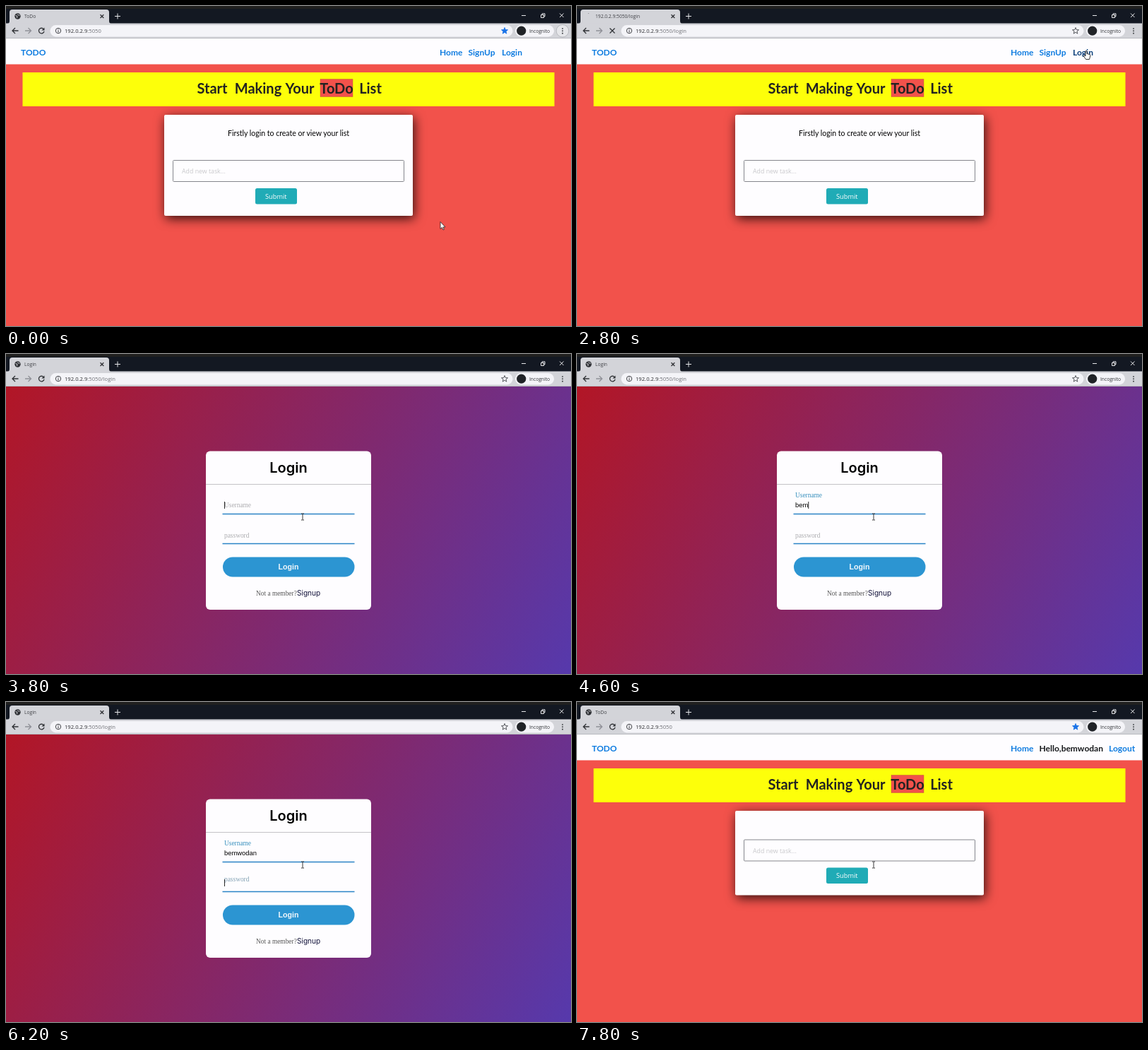
An HTML page for the animation above (8 s loop, 800 by 453 pixels).

```html
<!DOCTYPE html>
<html lang="en">
<head>
<meta charset="utf-8">
<title>ToDo</title>
<style>
  html, body { margin: 0; width: 100%; height: 100%; overflow: hidden; background: #131822; }
  svg { display: block; width: 100%; height: 100%; }
  text { white-space: pre; }
  .ui { font-family: "Open Sans", sans-serif; }
  .casual { font-family: Lato, sans-serif; font-weight: 700; }
  .round { font-family: Inter, sans-serif; }
  .serif { font-family: "Liberation Serif", serif; font-size: 9.4px; }
  .arial { font-family: "Liberation Sans", sans-serif; }
  .mid { text-anchor: middle; }
  .line { fill: none; stroke: #303236; stroke-width: 1.3; }
  .nav { font-size: 12px; fill: #0f7ce0; }
  .heading { font-size: 20px; fill: #222; text-anchor: middle; }
  #card { filter: drop-shadow(2px 4px 8px rgba(0, 0, 0, .8)); }
</style>
</head>
<body>
<svg viewBox="0 0 800 453">
  <defs>
    <linearGradient id="dusk" gradientUnits="userSpaceOnUse" x1="12" y1="25.5" x2="788" y2="473.5">
      <stop stop-color="#b21626"/><stop offset="1" stop-color="#5639ac"/>
    </linearGradient>
  </defs>

  <g id="home">
    <rect y="46" width="800" height="407" fill="#f2524b"/>
    <rect y="46" width="800" height="36.5" fill="#fefdff"/>
    <g class="casual nav">
      <text x="21" y="69.5">TODO</text>
      <text x="614" y="69.5">Home</text>
      <g id="guestLinks">
        <text x="654.5" y="69.5">SignUp</text>
        <text id="loginLink" x="702" y="69.5">Login</text>
      </g>
      <g id="memberLinks">
        <text id="greeting" x="654.5" y="69.5" fill="#16181b"></text>
        <text x="753" y="69.5">Logout</text>
      </g>
    </g>
    <rect x="23.5" y="94" width="753" height="48" fill="#fdff0a"/>
    <rect x="445" y="103.5" width="46" height="25" fill="#f2524b" stroke="#b5542c" stroke-width=".8" stroke-dasharray="1 1"/>
    <g class="casual heading">
      <text x="292" y="124">Start</text>
      <text x="357" y="124">Making</text>
      <text x="416" y="124">Your</text>
      <text x="468" y="124">ToDo</text>
      <text x="516" y="124">List</text>
    </g>
    <rect id="card" x="224" y="154" width="352" height="143" rx="2" fill="#fefdff"/>
    <text id="hint" class="casual mid" style="font-weight:400" x="400" y="184" font-size="10.5">Firstly login to create or view your list</text>
    <g id="taskForm" class="ui">
      <rect x="236.5" y="218.5" width="327" height="30" rx="1" fill="#fefdff" stroke="#85868c"/>
      <text x="249" y="237" font-size="8.8" fill="#c9c9cc">Add new task...</text>
      <rect x="353" y="258" width="59" height="22.5" rx="2.5" fill="#20abb6"/>
      <text class="mid" x="382.3" y="272.7" font-size="9.2" fill="#fff">Submit</text>
    </g>
  </g>

  <g id="login">
    <rect y="46" width="800" height="407" fill="url(#dusk)"/>
    <rect x="283" y="137.5" width="234" height="224.5" rx="6" fill="#fefdff"/>
    <text class="round mid" x="400" y="168" font-size="20" font-weight="600">Login</text>
    <path d="M283 184.5H517" stroke="#c4c3c7"/>
    <path d="M306.5 226.5H493.5M306.5 268.5H493.5" stroke="#2a83c6" stroke-width="1.5"/>
    <text id="userLabel" class="serif" x="309">Username</text>
    <text id="passLabel" class="serif" x="309">password</text>
    <text id="userText" class="arial" x="309" y="217" font-size="9.4"></text>
    <text id="passText" class="arial" x="309" y="259.3" font-size="9.4"></text>
    <path id="caret" d="M.5 0V10" stroke="#111" stroke-width=".9"/>
    <rect x="307" y="287.5" width="186.5" height="28" rx="14" fill="#2c95d2"/>
    <text class="arial mid" x="400" y="304.5" font-size="10.6" font-weight="700" fill="#f2f8fc">Login</text>
    <text class="serif" x="354" y="342.3" fill="#555">Not a member?</text>
    <text class="round" x="412" y="342.3" font-size="10.1" fill="#12123a">Signup</text>
  </g>

  <g id="browser">
    <rect width="800" height="25" fill="#131822"/>
    <rect width="800" height="4" fill="#20201f"/>
    <path d="M2 25Q5 25 5 21V9Q5 5 9 5H142Q146 5 146 9V21Q146 25 149 25Z" fill="#d3d4d9"/>
    <rect y="24.5" width="800" height="21.5" fill="#d3d4d9"/>
    <path d="M0 45.5H800" stroke="#b9babf"/>
    <g id="globe">
      <circle cx="16.5" cy="14.5" r="4.2" fill="#303236"/>
      <path d="M13.5 13.5L16 14.5 15.5 17M16 11.5L17.5 13H19.5" fill="none" stroke="#d3d4d9"/>
    </g>
    <circle id="spinner" cx="16.5" cy="14.5" r="4" fill="none" stroke="#85878d"/>
    <text id="tabTitle" class="ui" x="26" y="17" font-size="6.7" fill="#404247"></text>
    <path class="line" d="M133.5 12.2L138.3 17M138.3 12.2L133.5 17"/>
    <g fill="none" stroke="#e4e5e8">
      <path d="M154 14.5H162M158 10.5V18.5M730 13.5H736M784 10.5L789.5 16M789.5 10.5L784 16"/>
      <path d="M757.5 12.5H761.5V16.5H757.5ZM759 12V10.8H763V14.8H762"/>
    </g>
    <path class="line" d="M17.5 35H9M13 31L9 35 13 39"/>
    <path class="line" style="stroke:#909198" d="M27 35H35.5M31.5 31L35.5 35 31.5 39"/>
    <g id="reload">
      <path class="line" d="M53.2 32.6A3.8 3.8 0 1 0 54 35.8"/>
      <path d="M54.5 30.5V34.5H50.5Z" fill="#303236"/>
    </g>
    <path id="stop" class="line" d="M46.5 31.5L53.5 38.5M53.5 31.5L46.5 38.5"/>
    <rect x="62.5" y="27" width="655" height="16.5" rx="8.2" fill="#f4f4f8"/>
    <circle class="line" style="stroke-width:.9" cx="74" cy="35" r="3.7"/>
    <path class="line" style="stroke-width:1" d="M74 34.5V37.3M74 32.6V33.6"/>
    <text class="ui" x="83" y="37.8" font-size="7.65" fill="#28292d"><tspan id="host"></tspan><tspan id="path" fill="#707177"></tspan></text>
    <path id="star" d="M706 30.5L707.2 33.6 710.5 33.8 707.9 35.9 708.8 39.1 706 37.3 703.2 39.1 704.1 35.9 701.5 33.8 704.8 33.6Z" stroke-width=".9"/>
    <rect x="721" y="27" width="55" height="16.5" rx="8.2" fill="#f4f4f8"/>
    <circle cx="729.7" cy="35.2" r="6.6" fill="#202327"/>
    <text class="ui" x="741" y="37.6" font-size="6.7" fill="#303236">Incognito</text>
    <circle id="menuGlow" cx="788" cy="35.2" r="8.8" fill="#e6e7ea" stroke="#aeb0b5" stroke-width=".8"/>
    <path d="M787.2 31.2h1.6v1.6h-1.6zm0 3.3h1.6v1.6h-1.6zm0 3.3h1.6v1.6h-1.6z" fill="#303236"/>
  </g>

  <g id="pointer" stroke-linejoin="round">
    <path id="arrow" d="M0 0V10L2.3 7.9 4 11.5 5.4 10.8 3.9 7.4H7Z" fill="#fff" stroke="#222" stroke-width=".8"/>
    <path id="hand" d="M-1 8V1Q0-.6 1 1V4.5L5 5.5Q6 6 5.7 8L4.5 12.5H-.5L-3.6 8Q-3.8 6.4-2.3 7Z" fill="#fff" stroke="#222" stroke-width=".9"/>
    <path id="beam" d="M-2-4.5H-.6L0-4 .6-4.5H2M0-4V4M-2 4.5H-.6L0 4 .6 4.5H2" fill="none" stroke="#222" stroke-width=".9"/>
  </g>
</svg>

<script>
const LOOP = 8000, STEP = 200;
const HOST = "192.0.2.9", PORT = ":5050", USER = "bemwodan";
const CLICK = 2800, LOGIN_SHOWN = 3000, USER_FOCUS = 3800, FIRST_KEY = 4200, KEY_GAP = 200;
const PASS_FOCUS = 6080, PASS_KEY = 7200, SUBMIT = 7400, HOME_SHOWN = 7800;

const $ = id => document.getElementById(id);
const show = (id, on) => { $(id).style.display = on ? "" : "none"; };
const moveTo = (id, x, y) => $(id).setAttribute("transform", `translate(${x} ${y})`);
const lerp = (a, b, k) => a + (b - a) * k;
const ease = (t, start, length) => {
  const k = Math.min(1, Math.max(0, (t - start) / length));
  return k * k * (3 - 2 * k);
};

$("host").textContent = HOST;
$("greeting").textContent = "Hello," + USER;

function drawPointer(t) {
  const up = ease(t, 850, 1400), down = ease(t, LOGIN_SHOWN, 700);
  const x = lerp(lerp(615, 721, up), 420, down);
  const y = lerp(lerp(305.5, 63, up), 230.5, down);
  const overLink = up > .97 && down === 0;
  const overField = x < 494 && y > 205;
  moveTo("pointer", x, y);
  show("hand", overLink);
  show("beam", overField);
  show("arrow", !overLink && !overField);
  $("loginLink").setAttribute("fill", overLink ? "#0a3f7a" : "#0f7ce0");
}

function drawLabel(id, baseline, lift) {
  const mix = [[173, 58], [173, 145], [176, 190]].map(([a, b]) => Math.round(lerp(a, b, lift)));
  $(id).setAttribute("y", baseline - 14.5 * lift);
  $(id).setAttribute("fill", `rgb(${mix})`);
}

function drawForm(t) {
  const typed = Math.min(USER.length, Math.max(0, Math.floor((t - FIRST_KEY) / KEY_GAP) + 1));
  const inPass = t >= PASS_FOCUS;
  $("userText").textContent = USER.slice(0, typed);
  $("passText").textContent = t >= PASS_KEY ? "•" : "";
  drawLabel("userLabel", 217.3, ease(t, USER_FOCUS, 300));
  drawLabel("passLabel", 259.5, ease(t, PASS_FOCUS, 300));

  const lastKey = typed ? FIRST_KEY + (typed - 1) * KEY_GAP : USER_FOCUS;
  const lastInput = t >= PASS_KEY ? PASS_KEY : inPass ? PASS_FOCUS : lastKey;
  const field = $(inPass ? "passText" : "userText");
  show("caret", t >= USER_FOCUS && (t - lastInput) % 1000 < 500);
  moveTo("caret", 309 + field.getComputedTextLength(), inPass ? 251 : 209);
}

function drawBrowser(t, onLogin) {
  const loadStart = t < LOGIN_SHOWN ? CLICK : SUBMIT;
  const loading = t >= loadStart && t < (loadStart === CLICK ? LOGIN_SHOWN : HOME_SHOWN);
  const loginUrl = t >= CLICK && t < SUBMIT;
  const path = PORT + (loginUrl ? "/login" : "");
  $("path").textContent = path;
  $("tabTitle").textContent = loading ? HOST + path : onLogin ? "Login" : "ToDo";
  $("star").setAttribute("fill", loginUrl ? "none" : "#1a73e8");
  $("star").setAttribute("stroke", loginUrl ? "#45474c" : "#1a73e8");
  show("globe", !loading);
  show("reload", !loading);
  show("stop", loading);
  show("spinner", loading);
  const elapsed = t - loadStart;
  if (loading) {
    $("spinner").setAttribute("stroke-dasharray", `${1 + elapsed * .045} 30`);
    $("spinner").setAttribute("transform", `rotate(${elapsed * .7 - 100} 16.5 14.5)`);
  }
  $("menuGlow").setAttribute("opacity", 1 - ease(t, 200, 600));
}

function draw(t) {
  const onLogin = t >= LOGIN_SHOWN && t < HOME_SHOWN;
  const member = t >= HOME_SHOWN;
  show("home", !onLogin);
  show("login", onLogin);
  show("guestLinks", !member);
  show("memberLinks", member);
  show("hint", !member);
  $("card").setAttribute("height", member ? 119.5 : 143);
  moveTo("taskForm", 0, member ? -23.5 : 0);
  if (onLogin) drawForm(t);
  drawBrowser(t, onLogin);
  drawPointer(t);
}

const begin = performance.now();
function tick() {
  const t = (performance.now() - begin) % LOOP;
  draw(Math.floor(t / STEP) * STEP);
  requestAnimationFrame(tick);
}
tick();
</script>
</body>
</html>
```
